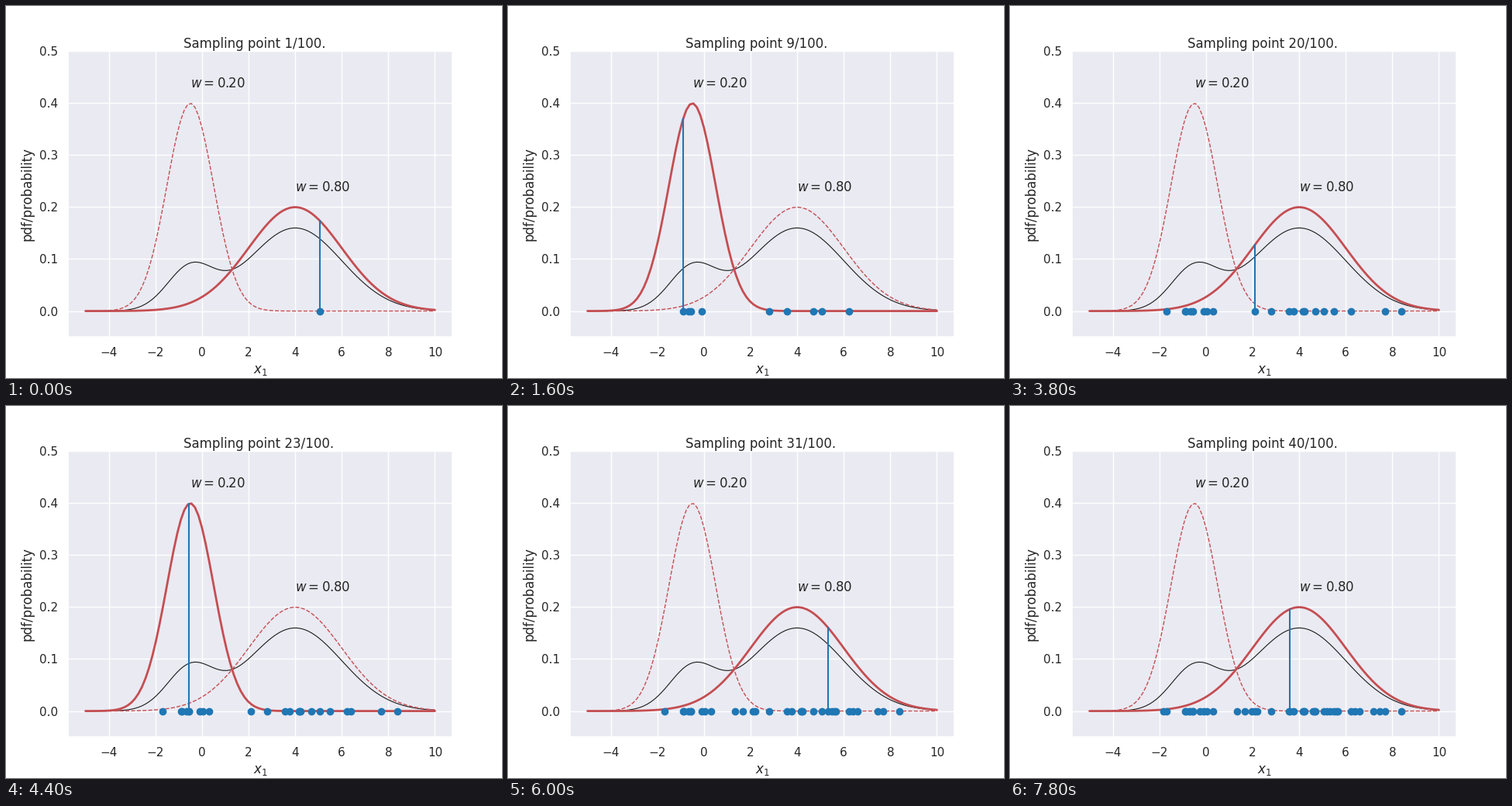
A matplotlib script for the animation above (8 s loop, 640 by 480 pixels).

```python
import numpy as np
import matplotlib.pyplot as plt
from matplotlib.animation import FuncAnimation

INK = "0.15"
RED = "#c44e52"
BLUE = "#1f77b4"

plt.rcParams.update({
    "font.family": "DejaVu Sans",
    "font.size": 12,
    "text.color": INK,
    "axes.facecolor": "#eaeaf2",
    "axes.edgecolor": "white",
    "axes.linewidth": 1.25,
    "axes.labelcolor": INK,
    "axes.labelsize": 12,
    "axes.axisbelow": True,
    "axes.grid": True,
    "grid.color": "white",
    "grid.linewidth": 1,
    "xtick.labelsize": 11,
    "ytick.labelsize": 11,
    "xtick.color": INK,
    "ytick.color": INK,
    "xtick.major.size": 6,
    "ytick.major.size": 6,
    "xtick.bottom": False,
    "ytick.left": False,
    "lines.solid_capstyle": "round",
})

MEANS = (-0.5, 4.0)
SIGMAS = (1.0, 2.0)
WEIGHTS = (0.2, 0.8)

# Draws in order; NARROW holds the indices that came from the first component.
SAMPLES = np.array([
    5.07, 2.80, -0.66, 6.23, 4.70, -0.55, 3.57, -0.11, -0.89, 4.17,
    -1.69, 7.70, 0.30, 8.39, 4.23, -0.86, 3.77, 0.04, 5.49, 2.10,
    6.39, 4.20, -0.55, 5.60, 1.34, 2.20, 7.46, 1.66, 6.59, 5.66,
    5.33, 4.60, -0.73, 7.20, 1.97, -1.82, 5.20, -0.25, 4.66, 3.60,
])
NARROW = {2, 5, 7, 8, 10, 12, 15, 17, 22, 32, 35, 37}


def pdf(x, k):
    z = (x - MEANS[k]) / SIGMAS[k]
    return np.exp(-z * z / 2) / (SIGMAS[k] * np.sqrt(2 * np.pi))


x = np.linspace(-5, 10, 100)
curves = [pdf(x, k) for k in (0, 1)]
mixture = sum(w * c for w, c in zip(WEIGHTS, curves))

fig, ax = plt.subplots(figsize=(6.4, 4.8), dpi=100)
ax.set(xlim=(-5.75, 10.75), ylim=(-0.05, 0.5),
       xlabel="$x_1$", ylabel="pdf/probability")
ax.set_xticks(range(-4, 11, 2))
ax.set_yticks(np.arange(0, 0.51, 0.1))

ax.plot(x, mixture, color="0.1", lw=0.8)
components = [ax.plot(x, c, color=RED)[0] for c in curves]
for k, mean in enumerate(MEANS):
    ax.text(mean, pdf(mean, k) + 0.03, f"$w = {WEIGHTS[k]:.2f}$")

stem, = ax.plot([], [], color=BLUE, lw=1.5)
dots, = ax.plot([], [], "o", color=BLUE, ms=6)
title = ax.text(0.3, 1.01, "", transform=ax.transAxes)


def update(i):
    active = 0 if i in NARROW else 1
    for k, line in enumerate(components):
        if k == active:
            line.set(linestyle="-", linewidth=2)
        else:
            line.set(linestyle="--", linewidth=1)
    s = SAMPLES[i]
    stem.set_data([s, s], [0, pdf(s, active)])
    dots.set_data(SAMPLES[:i + 1], np.zeros(i + 1))
    title.set_text(f"Sampling point {i + 1}/100.")
    return [*components, stem, dots, title]


anim = FuncAnimation(fig, update, frames=len(SAMPLES), interval=200,
                     init_func=lambda: update(0), repeat=True, repeat_delay=0)
plt.show()
```
